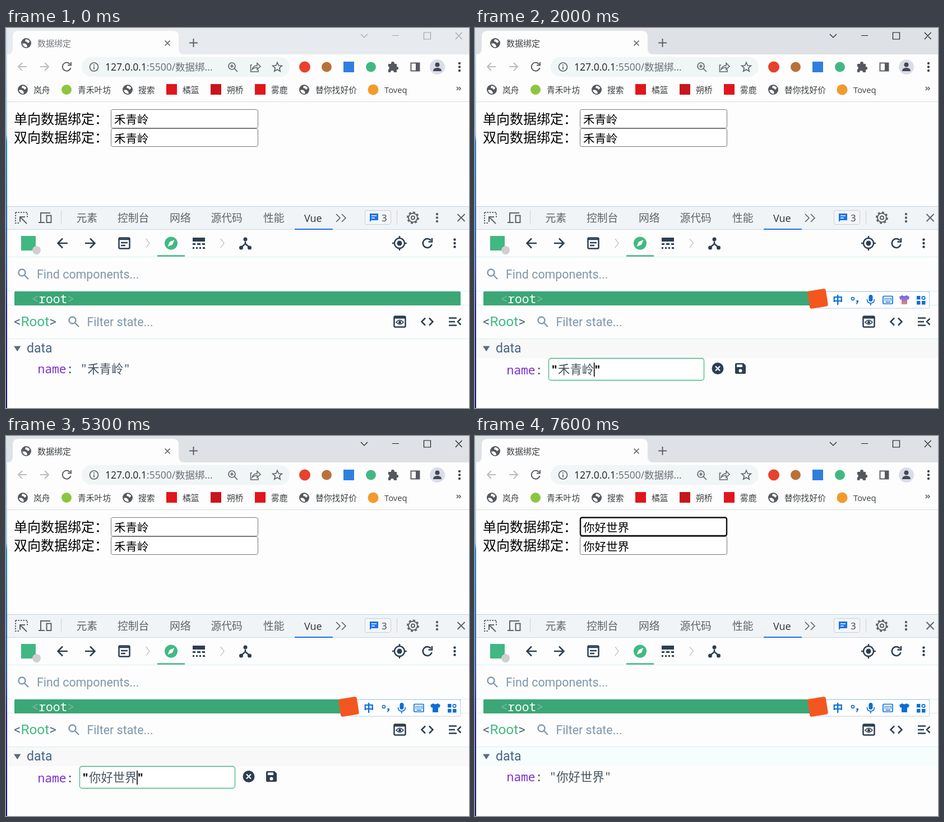
These frames come from a looping animation (826 by 678 pixels, 8000 ms). An HTML page:

```html
<!DOCTYPE html>
<html lang="zh-CN">
<head>
<meta charset="utf-8">
<title>数据绑定</title>
<style>
html, body { margin: 0; width: 100%; height: 100%; overflow: hidden; background: #fdfdfd; }
svg { display: block; width: 826px; height: 678px; }
text { font-family: "Open Sans", "Noto Sans CJK SC", "Noto Sans CJK JP", sans-serif; white-space: pre; }
.bm text { font-size: 14.8px; fill: #3c4043; }
.tabs text { font-size: 18.8px; fill: #5f6368; }
.page text { font-size: 24px; fill: #000; }
.page .val { font-size: 20.5px; }
.rob { font: 21.4px Roboto, sans-serif; }
.hint { fill: #7f97ab; }
.mono { font: 21.3px "Noto Sans Mono", "Noto Sans CJK SC", "Noto Sans CJK JP", monospace; fill: #2c3e50; }
.cjk { font-weight: 300; fill: #46535f; }
.q { font-weight: 600; fill: #111; }
.l { fill: none; stroke: #5f6368; stroke-width: 2; }
.thin { stroke-width: 1.7; }
.v { fill: none; stroke: #2c3e50; stroke-width: 2.5; }
.f { fill: #2c3e50; }
.rule { fill: #d8f0ee; }
.ime { fill: #0a6fd6; }
</style>
</head>
<body>
<svg viewBox="0 0 826 678">
<defs>
  <linearGradient id="edge" x2="0" y2="1">
    <stop offset="0" stop-color="#cfe6f4"/><stop offset=".28" stop-color="#9ccdf0"/>
    <stop offset=".3" stop-color="#1687d8"/><stop offset=".62" stop-color="#1c55c4"/>
    <stop offset=".75" stop-color="#1a1d96"/><stop offset="1" stop-color="#15156e"/>
  </linearGradient>
  <linearGradient id="warm" x2="0" y2="1">
    <stop offset="0" stop-color="#6a6cf0"/><stop offset=".5" stop-color="#a071d0"/><stop offset="1" stop-color="#f58a5c"/>
  </linearGradient>
  <radialGradient id="glow"><stop offset="0" stop-color="#ffe98a"/><stop offset="1" stop-color="#fff6cf" stop-opacity="0"/></radialGradient>
  <g id="globe">
    <circle r="9" fill="#55595e"/>
    <path d="M-7 1Q-3 -1 0 2T1 7.500Q-5 7 -7 1ZM-1 -7Q3 -7 6 -4Q6 -1 3 0Q2 -3 -2 -3Z" fill="#fdfdfd"/>
  </g>
  <g id="dots"><circle cy="-6.500" r="2.200"/><circle r="2.200"/><circle cy="6.500" r="2.200"/></g>
  <g id="lens" fill="none" stroke="#7f97ab" stroke-width="2.400"><circle cx="-2.500" cy="-2.500" r="6"/><path d="M2 2L9 9"/></g>
  <path id="shirt" d="M-4 -8Q0 -5 4 -8L9 -5L7 0L5 -1V8H-5V-1L-7 0L-9 -5Z"/>
</defs>

<rect width="826" height="678" fill="#fdfdfd"/>

<!-- tab strip -->
<rect width="826" height="47" fill="#e7eaee"/>
<rect width="826" height="47" fill="#dee1e6" data-on="1300-8000"/>
<path d="M2 47Q12 47 12 37V15Q12 5 22 5H298Q308 5 308 15V37Q308 47 318 47Z" fill="#fdfdfd"/>
<use href="#globe" x="36" y="27"/>
<text id="title" x="56" y="32.500" font-size="15">数据绑定</text>
<path class="l thin" d="M283.500 22.500L292.500 31.500M292.500 22.500L283.500 31.500"/>
<path class="l" d="M327 26.500H342M334.500 19V34"/>
<path id="win" fill="none" stroke-width="1.200" d="M633 11L639 17L645 11M689 13.500H701M745.500 8H757.500V20H745.500ZM802 8L813.500 20M813.500 8L802 20"/>

<!-- address row -->
<g class="l">
  <path d="M37 69H22M29 62L22 69L29 76M61 69H76M69 62L76 69L69 76" stroke="#b9bcc0"/>
  <path d="M114.500 65A7.500 7.500 0 1 0 115.500 71M116 61V66.500H110"/>
</g>
<rect x="135" y="52" width="371" height="35" rx="17.500" fill="#f0f5f6"/>
<g class="l thin">
  <circle cx="157" cy="69.500" r="7.500"/><path d="M157 68.500V74M157 65V67"/>
  <circle cx="403" cy="68" r="6"/><path d="M407.500 72.500L413 78M400 68H406M403 65V71"/>
  <path d="M439 66H436.500V78H450V74M439 74Q441 67 448 67V62.500L454 68.500L448 74V70.500Q443 70 439 74Z" stroke-width="1.500"/>
  <path d="M484 61.500L486.400 67L492.300 67.500L487.800 71.400L489.200 77.200L484 74L478.800 77.200L480.200 71.400L475.700 67.500L481.600 67Z"/>
</g>
<text x="177" y="76" font-size="17.500" fill="#202124">127.0.0.1<tspan fill="#6a6e73">:5500/数据绑...</tspan></text>
<circle cx="533" cy="69.500" r="10" fill="#e8412d"/>
<circle cx="572" cy="69.500" r="9" fill="#b9713a"/>
<rect x="602" y="60" width="19" height="19" fill="#2f7fe0"/>
<circle cx="651" cy="69.500" r="9" fill="#41b883"/>
<path d="M682 64H687V63A3 3 0 0 1 693 63V64H697V69H698A2.800 2.800 0 0 1 698 74.500H697V79H692A3 3 0 0 0 686 79H682V74A3 3 0 0 0 682 68.500Z" fill="#55595e"/>
<path d="M722.500 62.500H737.500V76.500H722.500Z" class="l"/><path d="M731 62H738V77H731Z" fill="#55595e"/>
<circle cx="769.500" cy="69.500" r="13.500" fill="#dadcec"/>
<g fill="#45494f"><circle cx="769.500" cy="65.500" r="4"/><path d="M762 77Q762 71 769.500 71T777 77Z"/><use href="#dots" x="809" y="69.500"/></g>

<!-- bookmarks -->
<g class="bm">
  <use href="#globe" x="30" y="110"/><text x="49" y="115.500">岚舟</text>
  <circle cx="108" cy="110" r="9" fill="#8cc63e"/><text x="128" y="115.500">青禾叶坊</text>
  <use href="#globe" x="217" y="110"/><text x="236" y="115.500">搜索</text>
  <rect x="286" y="100" width="19" height="19" fill="#e0161c"/><text x="315" y="115.500">橘篮</text>
  <rect x="365" y="100" width="19" height="19" fill="#c8161d"/><text x="394" y="115.500">朔桥</text>
  <rect x="444" y="100" width="19" height="19" fill="#e0161c"/><text x="473" y="115.500">雾鹿</text>
  <use href="#globe" x="532" y="110"/><text x="552" y="115.500">替你找好价</text>
  <circle cx="655" cy="110" r="9.500" fill="#f29a2e"/><text x="675" y="115.500">Toveq</text>
  <path class="l thin" d="M804 105L807 108L804 111M808 105L811 108L808 111"/>
</g>
<rect y="131" width="826" height="1" fill="#d5d8dc"/>

<!-- page -->
<g class="page">
  <text x="14" y="170.500">单向数据绑定：</text><text x="14" y="204">双向数据绑定：</text>
  <g fill="#fff" stroke="#767676">
    <rect x="187.500" y="145.500" width="262" height="33" rx="3"/>
    <rect x="187.500" y="179.500" width="262" height="32" rx="3"/>
    <rect x="187.500" y="179.500" width="262" height="32" rx="3" stroke="#333" data-on="6700-6800"/>
    <rect x="187.500" y="145.500" width="262" height="33" rx="3" stroke="#333" data-on="6800-7100"/>
    <rect x="188" y="145.500" width="261" height="32.500" rx="3" stroke="#101010" stroke-width="2.400" data-on="7100-8000"/>
  </g>
  <text class="val" x="193" y="171"></text><text class="val" x="193" y="204.500"></text>
  <rect x="275" y="152" width="1.200" height="22" data-on="7100-7600"/>
</g>

<!-- inspector tabs -->
<rect y="318" width="826" height="42" fill="#f0f4f6"/>
<rect y="318" width="826" height="1" fill="#c6d4e2"/><rect y="359" width="826" height="1" fill="#cbd8e4"/>
<g class="tabs">
  <path class="l" d="M17 329H38V338M17 329V348H25" stroke-dasharray="2.500 2"/>
  <path class="l" d="M37 349L26 338M25 346V337H34"/>
  <path class="l" d="M62 346V330H79M58 347H69M72.500 334.500H80.500V347H72.500Z"/>
  <path d="M98.500 326V351M697.500 326V351" stroke="#cbd0d8"/>
  <text x="125.500" y="346">元素</text><text x="199" y="346">控制台</text><text x="292" y="346">网络</text>
  <text x="365.500" y="346">源代码</text><text x="459" y="346">性能</text>
  <text x="532" y="346" style="font-size:18px;fill:#2c3036">Vue</text>
  <rect x="515" y="358" width="68" height="2" fill="#1a73e8"/>
  <path class="l thin" d="M589 332L596 339L589 346M599 332L606 339L599 346"/>
  <rect x="640.500" y="325.500" width="46" height="25" rx="3" fill="#f4f6fa" stroke="#c9ced6"/>
  <path d="M649 331H664V343H652L649 346Z" fill="#1a73e8"/><path d="M652 335H661M652 339H658" stroke="#fff" stroke-width="1.500"/>
  <text x="670" y="345" style="font-size:17px;fill:#3c4043">3</text>
  <g class="l"><circle cx="726" cy="338.500" r="8"/><circle cx="726" cy="338.500" r="3"/>
    <circle cx="726" cy="338.500" r="9.500" stroke-width="3" pathLength="16" stroke-dasharray="1"/>
    <path d="M805.500 332L818.500 345M818.500 332L805.500 345"/></g>
  <use href="#dots" x="769" y="338.500" fill="#5f6368"/>
</g>

<!-- component panel -->
<rect x="27" y="371" width="26" height="26" fill="#41b883"/>
<circle cx="54.500" cy="396.500" r="7.500" fill="#cfcfcf"/>
<g class="v">
  <path d="M110 384H93M101 375.500L92.500 384L101 392.500M141 384H158M150 375.500L158.500 384L150 392.500"/>
  <rect x="201.500" y="374.500" width="19" height="19" rx="2"/><path d="M201 377H221M205 383H217M205 388H213"/>
  <path d="M250 376L256 384L250 392M383 376L389 384L383 392" stroke="#c3c9cf" stroke-width="1.500"/>
  <path d="M427 381V385L419 392M427 385L435 392"/>
  <circle cx="702" cy="384" r="9"/><path d="M702 371V376M702 392V397M689 384H694M710 384H715"/>
  <path d="M758 379A8 8 0 1 0 759.500 386M760 375V381.500H753.500"/>
</g>
<circle cx="294.500" cy="384" r="11.500" fill="#42b983"/>
<path d="M300.500 378L297 386.500L288.500 390L292 381.500Z" fill="#fff"/>
<rect x="270" y="405" width="49" height="3" fill="#5fc099"/>
<g class="f">
  <path d="M333 374H355V381H333ZM333 384H338V387H333ZM341 384H347V387H341ZM350 384H355V387H350ZM333 391H336V394H333ZM339 391H342V394H339ZM345 391H348V394H345ZM351 391H355V394H351Z"/>
  <circle cx="427" cy="377" r="3.500"/><circle cx="419.500" cy="392" r="3.500"/><circle cx="434.500" cy="392" r="3.500"/>
  <circle cx="702" cy="384" r="4.500"/><use href="#dots" x="800.500" y="384"/>
</g>
<rect class="rule" y="408" width="826" height="1"/>
<use href="#lens" x="31" y="439"/>
<text class="rob hint" x="55" y="446.500">Find components...</text>
<rect class="rule" y="469" width="826" height="1"/>
<rect class="rule" y="494" width="826" height="1"/>
<rect x="15" y="470" width="796" height="25" rx="1.500" fill="#3ba776"/>
<text class="mono" x="45.500" y="491" style="fill:#8bb5a5">&lt;<tspan fill="#fff" font-weight="500">root</tspan>&gt;</text>

<!-- state panel -->
<text class="rob" x="14" y="532" style="font-size:24.4px" fill="#566b7e">&lt;<tspan fill="#42b983">Root</tspan>&gt;</text>
<use href="#lens" x="121" y="524"/>
<text class="rob hint" x="144.500" y="532">Filter state...</text>
<g class="v">
  <rect x="692.500" y="514.500" width="20" height="19" rx="2"/><path d="M692 516.500H713" stroke-width="4"/>
  <path d="M696 525Q702.500 517.500 709 525Q702.500 532 696 525Z" stroke-width="1.600"/>
  <path d="M748 517.500L741.500 524L748 530.500M755 517.500L761.500 524L755 530.500M790 517.500H804M790 524H801M790 530.500H804M811.500 518.500L806 524L811.500 529.500"/>
</g>
<circle class="f" cx="702.500" cy="525" r="2.500"/>
<rect class="rule" y="554" width="826" height="1"/>
<rect y="555" width="826" height="34" fill="#f3fdfb" data-on="400-600"/>
<rect y="555" width="826" height="34" fill="#f8f8f8" data-on="600-5600"/>
<rect y="555" width="826" height="34" fill="#f6fefd" data-on="5600-8000"/>
<path d="M14 567.500H26.500L20.200 577Z" fill="#5b6d7e"/>
<text class="rob" x="37" y="578.500" style="font-size:23px" fill="#476582">data</text>

<g data-on="0-1300 6300-8000">
  <text class="mono" x="56.500" y="616"><tspan fill="#7a2fd0">name</tspan>:</text>
  <text class="mono cjk" x="132.500" y="616">"<tspan id="shown"></tspan>"</text>
</g>
<rect x="232" y="590" width="30" height="32" rx="3" fill="#e8f8f2" data-on="1100-1300"/>
<g class="f" data-on="600-1300">
  <path d="M237 616V612L248 601L252 605L241 616ZM249.500 599.500L252 597.500L256 601.500L253.500 603.500Z"/>
  <use href="#dots" x="286.500" y="607.500"/>
</g>

<g data-on="1300-6300">
  <text class="mono" x="56.500" y="618"><tspan fill="#7a2fd0">name</tspan>:</text>
  <rect x="131.500" y="589.500" width="277" height="39" rx="4" fill="#fff" stroke="#42b983" stroke-width="1.300"/>
  <text class="mono cjk" x="135.300" y="617"><tspan class="q">"</tspan><tspan id="field"></tspan><tspan class="q">"</tspan></text>
  <rect id="caret" y="597" width="1.600" height="25" data-on="1300-1600 1900-5600"/>
  <circle class="f" cx="433" cy="607.500" r="10.500"/>
  <path d="M429 603.500L437 611.500M437 603.500L429 611.500" stroke="#fff" stroke-width="2.200"/>
  <rect x="459" y="592" width="29" height="31" rx="3" fill="#edfaf5" data-on="5900-6300"/>
  <path class="f" d="M466 598H479L483 602V615Q483 617 481 617H466Q464 617 464 615V600Q464 598 466 598Z"/>
  <path d="M467 600.500H477V605H467Z" fill="#fff"/><circle cx="473.500" cy="611.500" r="3" fill="#fff"/>
</g>

<!-- input method bar and candidates -->
<g data-on="1400-6400 7100-8000">
  <rect x="612" y="470.500" width="198.500" height="29.500" rx="2" fill="#fff" stroke="#b6cdee"/>
  <rect x="595" y="467" width="33" height="32" rx="4" fill="#f4561f" transform="rotate(-9 611.500 483)"/>
  <text class="ime" x="638" y="492" font-size="18.500" font-weight="700">中</text>
  <circle cx="674" cy="483" r="2.500" fill="none" stroke="#0a6fd6" stroke-width="1.700"/>
  <path class="ime" d="M680 486H684V489L681 493H680L681 489Z"/>
  <rect class="ime" x="702.500" y="476" width="7" height="12" rx="3.500"/>
  <path d="M699.500 484Q699.500 491 706 491T712.500 484M706 491V495" fill="none" stroke="#0a6fd6" stroke-width="1.700"/>
  <rect x="728" y="478.500" width="17" height="13.500" rx="1" fill="none" stroke="#0a6fd6" stroke-width="1.700"/>
  <path d="M730.500 482.500H743M730.500 485.500H743" stroke="#0a6fd6" stroke-width="2" stroke-dasharray="2 1.500"/>
  <path d="M732.500 489H741" stroke="#0a6fd6" stroke-width="1.700"/>
  <circle id="halo" cx="766.500" cy="485" r="13" fill="url(#glow)"/>
  <use class="ime" href="#shirt" x="766" y="485"/>
  <use id="tint" href="#shirt" x="766" y="485" fill="url(#warm)"/>
  <path class="ime" d="M788 478H794.500V484.500H788ZM788 487H794.500V493.500H788ZM797 487H803.500V493.500H797Z"/>
  <circle cx="800" cy="481.500" r="2.700" fill="none" stroke="#0a6fd6" stroke-width="1.700"/>
</g>
<g id="list">
  <rect x=".5" y="622.500" width="512" height="62" fill="#fcfcff" stroke="#cfcfe8"/>
  <text id="pinyin" x="14" y="645" font-size="18" fill="#444"></text>
  <text id="words" x="18" y="675" font-size="19" fill="#222"></text>
</g>
<rect width="2" height="678" fill="url(#edge)"/>
</svg>
<script>
const LOOP = 8000;
const $ = id => document.getElementById(id);
const OLD = '禾青岭', NEW = '你好世界';
const typed = [[0, OLD], [2300, '禾青'], [2500, '禾'], [2700, ''], [4000, '你好'], [5200, NEW]];
const saved = [[0, OLD], [6300, NEW]];
const syllables = [
  [0, ''], [3100, 'n'], [3200, 'ni'], [3400, "ni'h"], [3500, "ni'ha"], [3700, "ni'hao"], [4000, ''],
  [4300, 's'], [4400, 'sh'], [4500, 'shi'], [4600, "shi'j"], [4700, "shi'ji"], [4800, "shi'jie"], [5200, '']
];
const words = {
  n: '你 那 能 年 呢', "ni'hao": "你好 你号 拟好 (*'▽`)ノノ 你",
  s: '是 上 说 时 三', "shi'jie": '世界 视界 时节 使节 是'
};

const pick = (list, t) => list.filter(([at]) => at <= t).pop()[1];
const clamp = x => Math.max(0, Math.min(1, x));
const setText = (el, s) => { if (el.textContent !== s) el.textContent = s; };
const choices = s => (words[s] || (s[0] === 'n' ? '你 尼 泥 拟 呢' : '是 时 事 十 使'))
  .split(' ').map((w, i) => `${i + 1}.${w}`).join('  ');

const timed = [...document.querySelectorAll('[data-on]')].map(el => ({
  el, spans: el.dataset.on.split(' ').map(s => s.split('-').map(Number))
}));
const inputs = document.querySelectorAll('.val');

function draw(t) {
  for (const { el, spans } of timed)
    el.style.display = spans.some(([a, b]) => t >= a && t < b) ? '' : 'none';

  const active = t >= 1300;
  $('title').setAttribute('fill', active ? '#3c4043' : '#74787d');
  $('win').setAttribute('stroke', active ? '#1b1b1b' : '#a0a3a7');

  const now = pick(typed, t), value = pick(saved, t), keys = pick(syllables, t);
  const caretX = 148 + now.length * 21.3;
  inputs.forEach(el => setText(el, value));
  setText($('shown'), value);
  setText($('field'), now);
  $('caret').setAttribute('x', caretX);

  $('list').style.display = keys ? '' : 'none';
  $('list').setAttribute('transform', `translate(${caretX - 2} 0)`);
  setText($('pinyin'), keys);
  setText($('words'), keys ? choices(keys) : '');

  // The skin icon cools to blue, then glows briefly, in 100 ms steps.
  const step = Math.floor(t / 100) * 100;
  $('tint').style.opacity = clamp((3100 - step) / 900);
  $('halo').style.opacity = Math.sin(Math.PI * clamp((step - 3100) / 1900));
}

function tick(now) {
  draw(now % LOOP);
  requestAnimationFrame(tick);
}
draw(0);
requestAnimationFrame(tick);
</script>
</body>
</html>
```
